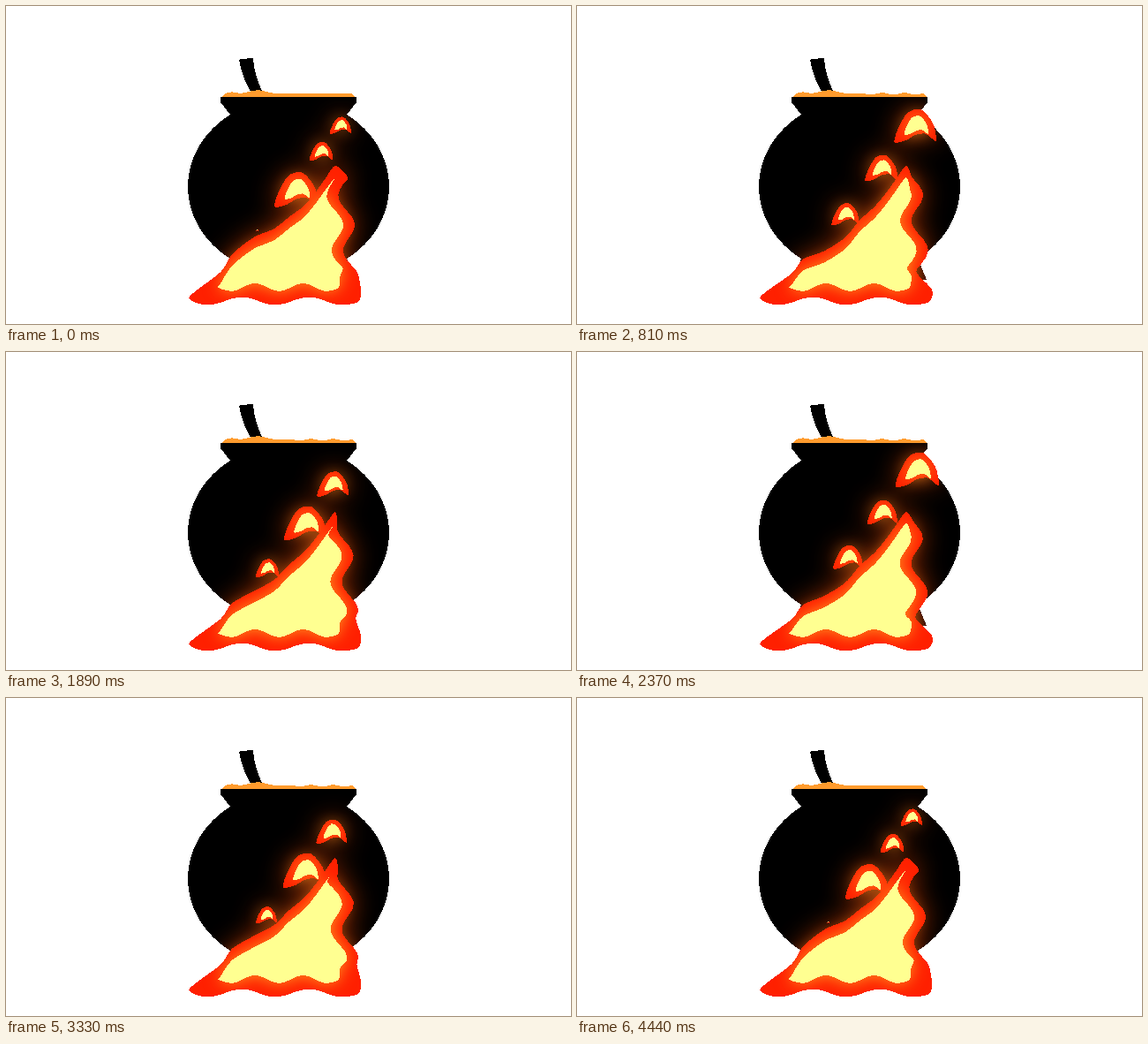
An HTML page that plays this animation: 640x360 px, repeating every 4500 ms.

```html
<!DOCTYPE html>
<html lang="en">
<head>
<meta charset="utf-8">
<title>Cauldron on the fire</title>
<style>
  html, body { margin: 0; width: 100%; height: 100%; overflow: hidden; background: #fff; }
  svg { display: block; width: 100%; height: 100%; }
</style>
</head>
<body>
<svg viewBox="0 0 640 360" shape-rendering="crispEdges">
  <defs>
    <filter id="wide" filterUnits="userSpaceOnUse" x="0" y="0" width="640" height="360" color-interpolation-filters="sRGB">
      <feGaussianBlur stdDeviation="15"/>
    </filter>
    <filter id="near" filterUnits="userSpaceOnUse" x="0" y="0" width="640" height="360" color-interpolation-filters="sRGB">
      <feGaussianBlur stdDeviation="9"/>
    </filter>
    <path id="outer"/>
    <path id="inner"/>
    <path id="pot" d="M243 103H397V109L386 123A114 100 0 0 1 386 286L396 310H244L254 286A114 100 0 0 1 254 123L243 109Z"/>
    <clipPath id="potClip"><use href="#pot"/></clipPath>
    <clipPath id="litClip"><use href="#pot"/><use href="#outer"/></clipPath>
  </defs>
  <path d="M264 61L266 60 280 59Q281 78 290 96L277 97Q268 82 264 61Z"/>
  <path id="soup" fill="#ff9b2d"/>
  <use href="#pot"/>
  <g clip-path="url(#potClip)"><use href="#outer" fill="#e04408" opacity=".7" filter="url(#wide)"/></g>
  <use href="#outer" fill="#ff2000"/>
  <g clip-path="url(#litClip)"><use href="#inner" fill="#ff9420" filter="url(#near)"/></g>
  <use href="#inner" fill="#ffff91"/>
</svg>
<script>
const LOOP = 4500, CYCLE = 33, LIFE = 3 * CYCLE, TAU = 2 * Math.PI;

// Left slope of the fire, from the ground to the top
const slope = [[243, 302], [256, 284], [280, 270], [304, 257], [320, 241], [338, 226], [352, 209], [362, 195], [373, 181]];
// Hooked lick of flame, one unit wide, with its tip at the origin
const lick = [[0, 0], [.1, -.35], [.33, -.72], [.65, -.78], [.93, -.45], [1, -.03], [.75, -.2], [.5, -.17], [.27, -.04]];

const bell = (x, centre, width) => Math.exp(-(((x - centre) / width) ** 2));

// Closed curve through all points
function curve(points) {
  const n = points.length, at = i => points[(i + n) % n];
  const handle = (i, sign) => [0, 1].map(k => at(i)[k] + sign * (at(i + 1)[k] - at(i - 1)[k]) / 7);
  return "M" + points[0] + points.map((_, i) => `C${handle(i, 1)} ${handle(i + 1, -1)} ${at(i + 1)}`).join("") + "Z";
}

// Body of the fire, shrunk by inset for the bright core
function body(phase, inset) {
  const breath = 8 * Math.cos(TAU * phase / CYCLE);
  const ground = (x, y) => [320 + (x - 320) * (1 - inset * .022), y - inset * 1.2];
  const points = [[208 + inset * 2.5, 329 - inset * .8]];
  for (const [x, y] of slope) points.push([x, y + inset - breath * bell(x, 285, 28)]);
  // Bulges climb the right side
  for (let y = 194 + inset; y <= 305; y += 9) {
    const bulge = Math.cos(TAU * ((y - 230) / 62 + (phase - 9) / CYCLE));
    points.push([382 + (y - 190) * .09 + 8 * bulge - inset, y]);
  }
  points.push(ground(402, 321));
  for (let x = 400; x > 215; x -= 12) points.push(ground(x, 334 + 4.5 * Math.cos(TAU * (x - 305) / 76)));
  return curve(points);
}

// Licks peel off the slope, drift up and burn out
function licks(phase, scale) {
  let d = "";
  for (let age = (phase + CYCLE - 9) % CYCLE - CYCLE; age < LIFE; age += CYCLE) {
    const u = age / LIFE;
    const size = Math.min(1, (u + .1) * 10, (1 - u) * 6) * (38 + 12 * Math.cos(TAU * (u - .28) / .54));
    if (u < -.1) continue;
    const climb = Math.sin(Math.max(0, u) * Math.PI / 2) ** 1.4;
    const place = ([x, y]) => [
      283 + 85 * climb + size * (.56 + (x - .56) * scale),
      255 - 112 * climb + size * (-.42 + (y + .42) * scale)];
    d += curve(lick.map(place));
  }
  return d;
}

function soup(phase) {
  const swell = 1.3 * Math.max(0, Math.sin(Math.PI * phase / 28));
  let d = "M245 103";
  for (let x = 248; x <= 392; x += 4) {
    const y = 99.3 - 4 * bell(x, 285, 13) - 2 * bell(x, 256, 6);
    d += `L${x} ${x > 320 ? y + swell * Math.sin(x / 4) : y}`;
  }
  return d + "L396 103Z";
}

function draw(step) {
  const phase = step % CYCLE;
  const set = (id, d) => document.getElementById(id).setAttribute("d", d);
  set("outer", body(phase, 0) + licks(phase, 1));
  set("inner", body(phase, 13) + licks(phase, .58));
  set("soup", soup(phase));
}

// Steps last 30 and 60 ms in turn
let shown = -1;
function tick() {
  const t = performance.now() % LOOP;
  const step = 2 * Math.floor(t / 90) + (t % 90 >= 30 ? 1 : 0);
  if (step !== shown) draw(shown = step);
  requestAnimationFrame(tick);
}
tick();
</script>
</body>
</html>
```
